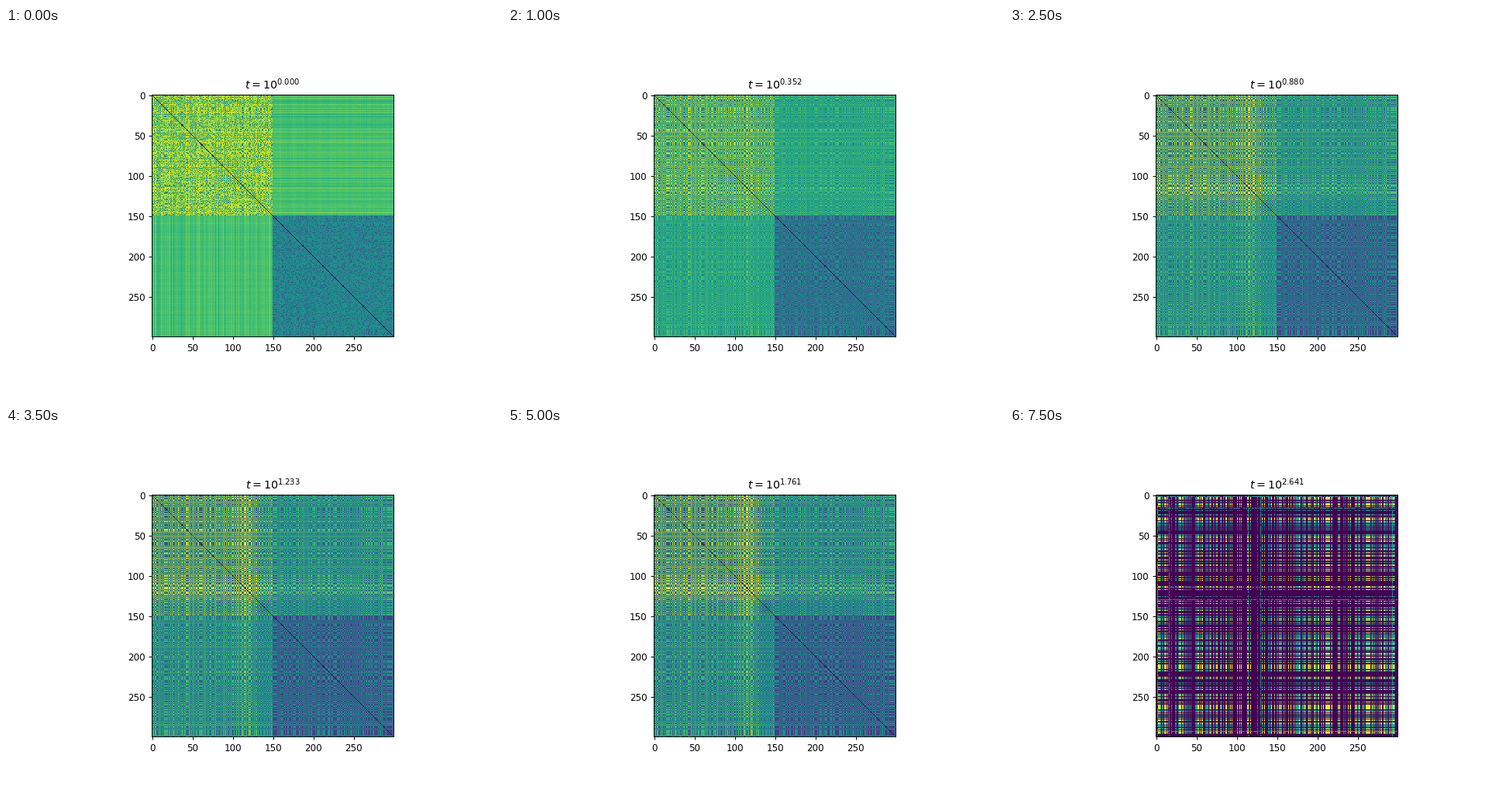
These frames come from a looping animation (640 by 480 pixels, 8000 ms). A matplotlib script:

```python
import numpy as np
import matplotlib.pyplot as plt
from matplotlib.animation import FuncAnimation

N, HALF = 300, 150
FRAMES, INTERVAL = 16, 500
COLLAPSE = 11  # step at which rounding error takes over
SCALE = 0.857  # text and tick size relative to the defaults

for key, size in {"font.size": 10, "axes.titlepad": 6, "axes.linewidth": 0.8}.items():
    plt.rcParams[key] = size * SCALE
for axis in "xy":
    for key, size in {"size": 3.5, "pad": 3.5, "width": 0.8}.items():
        plt.rcParams[f"{axis}tick.major.{key}"] = size * SCALE

rng = np.random.default_rng(7)
idx = np.arange(N)
first = idx < HALF


def by_block(a, ab, b):
    """Pick one value per cell from the two diagonal and the mixed blocks."""
    count = first[:, None].astype(int) + first[None, :]
    return np.choose(count, [b, ab, a])


def symmetric_noise():
    upper = np.triu(rng.random((N, N)), 1)
    return upper + upper.T


def bell(center, width):
    return np.exp(-((idx - center) / width) ** 2)


# Two-sided coordinate of every node along the slow diffusion mode
side = np.cumprod(np.where(rng.random(N) < 0.6, -1, 1))
coord = side * (0.5 + 0.12 * rng.standard_normal(N))
swell = 0.4 * bell(115, 13) - 0.4 * bell(140, 8)

# Distances after a single step
same = side[:, None] == side[None, :]
noise = symmetric_noise()
jitter = np.where(first, 0.035, 0.01) * rng.standard_normal(N)
start = by_block(np.where(same & (noise < 0.6), 0.5, 0.88),
                 0.71,
                 np.where(same & (noise < 0.45), 0.29, 0.49))
start += jitter[:, None] + jitter + 0.03 * (symmetric_noise() - 0.5)


def mixing(step):
    m = 1 - np.exp(-step / 3)
    z = coord * (1 + swell * m ** 2)
    gap = np.abs(z[:, None] - z)
    late = by_block(0.2, 0.27, 0.15) + by_block(0.6, 0.38, 0.32) * gap
    d = (1 - m) * start + m * late
    np.fill_diagonal(d, 0)
    return d


def collapsed():
    density = 0.43 + 0.1 * np.cos(2 * np.pi * (idx - 65) / 110)
    lit = rng.random(N) < density
    weight = lit * np.where(rng.random(N) < 0.6, 1, 0.6)
    d = np.outer(weight, weight)
    for row in rng.choice(N, 5, replace=False):
        d[row] = np.maximum(d[row], 0.5 * (rng.random(N) < 0.75))
        d[:, row] = d[row]
    return d


rounded = collapsed()

fig = plt.figure(figsize=(6.4, 4.8), dpi=100)
ax = fig.add_axes([188 / 640, 0.17, 312 / 640, 0.65])
image = ax.imshow(start, cmap="viridis", vmin=0, vmax=1, interpolation="nearest")
ax.set_xticks(range(0, N, 50))
ax.set_yticks(range(0, N, 50))
title = ax.set_title("")


def update(step):
    image.set_data(mixing(step) if step < COLLAPSE else rounded)
    title.set_text(f"$t=10^{{{step * np.log10(1.5):.3f}}}$")
    return image, title


anim = FuncAnimation(fig, update, frames=FRAMES, interval=INTERVAL,
                     repeat=True, repeat_delay=0)
plt.show()
```
